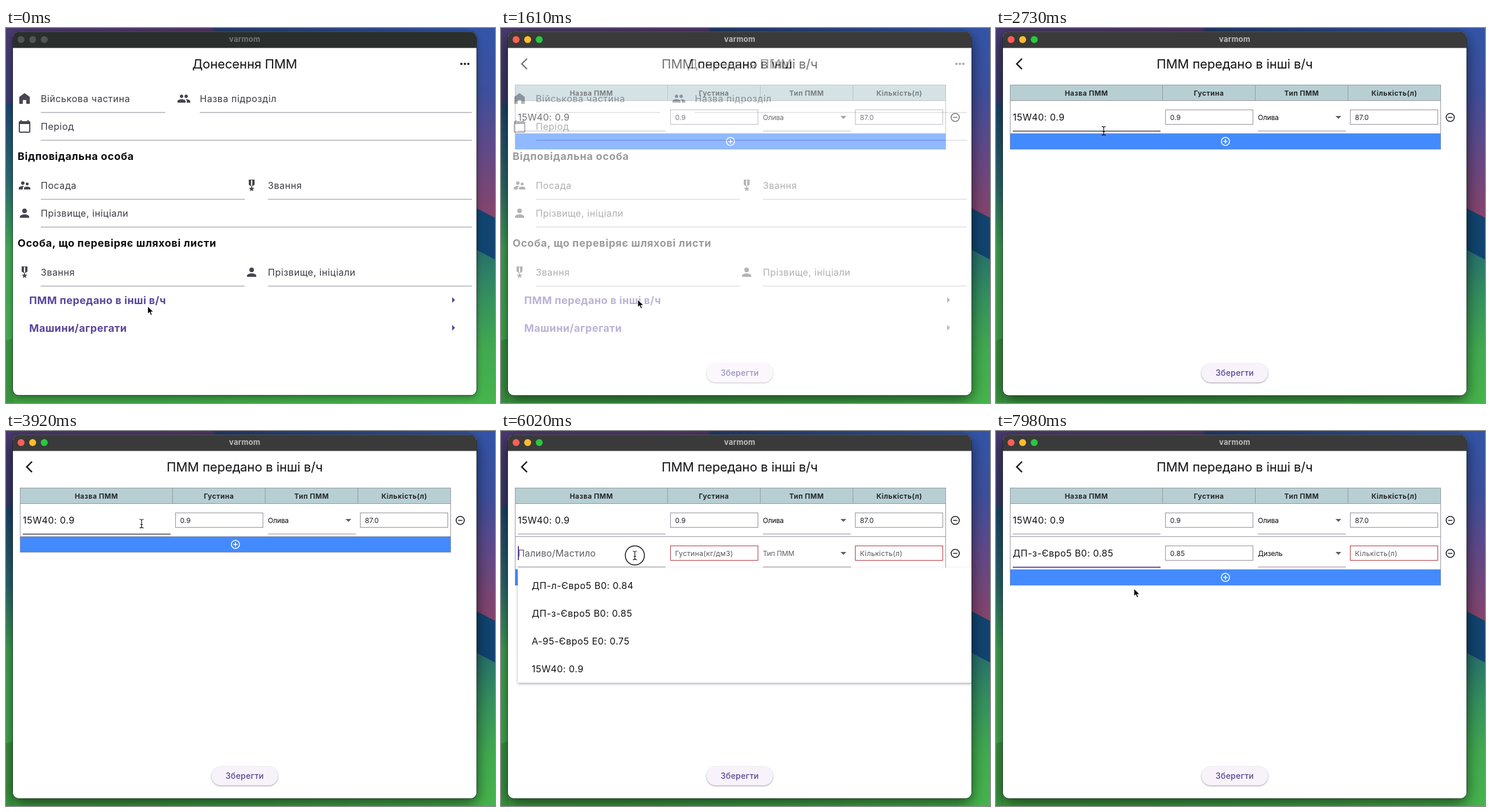
An HTML page for the animation above (8000 ms loop, 844 by 648 pixels).

```html
<!DOCTYPE html>
<html lang="uk">
<head>
<meta charset="utf-8">
<style>
html, body { margin: 0; width: 844px; height: 648px; overflow: hidden; }
svg { display: block; font-family: Inter, sans-serif; }
text { white-space: pre; }
.bar { font-size: 13px; font-weight: 700; letter-spacing: .25px; }
.title { font-size: 22px; letter-spacing: -.12px; fill: #121014; }
.body { font-size: 16px; letter-spacing: .53px; fill: #3d3943; }
.dark { font-size: 16px; letter-spacing: .47px; fill: #131115; }
.hint { font-size: 16px; letter-spacing: .15px; fill: #625d68; }
.head { font-size: 18px; letter-spacing: .58px; font-weight: 700; fill: #0c0a0e; }
.link { font-size: 18px; letter-spacing: .38px; font-weight: 700; fill: #5b4699; }
.col { font-size: 12px; letter-spacing: .5px; font-weight: 700; fill: #25282a; }
.cell { font-size: 12px; letter-spacing: .1px; fill: #221f25; }
.note { font-size: 12px; letter-spacing: .37px; fill: #57525d; }
.pick { font-size: 12px; letter-spacing: -.15px; fill: #060606; }
.save { font-size: 14px; letter-spacing: .25px; font-weight: 500; fill: #574592; }
</style>
</head>
<body>
<svg id="stage" width="844" height="648" viewBox="0 0 844 648">
  <defs>
    <linearGradient id="top">
      <stop offset="0" stop-color="#4a3a6c"/><stop offset=".42" stop-color="#503468"/>
      <stop offset=".43" stop-color="#223a68"/><stop offset="1" stop-color="#3355a8"/>
    </linearGradient>
    <linearGradient id="left" x2="0" y2="1">
      <stop offset="0" stop-color="#4a3a70"/><stop offset=".2" stop-color="#383a6c"/>
      <stop offset=".21" stop-color="#1b456e"/><stop offset=".42" stop-color="#2b6a70"/>
      <stop offset=".6" stop-color="#42a654"/><stop offset="1" stop-color="#46b04c"/>
    </linearGradient>
    <linearGradient id="right" x2="0" y2="1">
      <stop offset="0" stop-color="#3355a8"/><stop offset=".17" stop-color="#3d4f9c"/>
      <stop offset=".3" stop-color="#5c4a8c"/><stop offset=".5" stop-color="#86446c"/>
      <stop offset=".6" stop-color="#28726c"/><stop offset=".72" stop-color="#35905e"/>
      <stop offset=".86" stop-color="#42aa50"/><stop offset="1" stop-color="#46b44c"/>
    </linearGradient>
    <linearGradient id="low">
      <stop offset="0" stop-color="#3f9e42"/><stop offset=".3" stop-color="#3c9e44"/>
      <stop offset="1" stop-color="#46b44c"/>
    </linearGradient>
    <clipPath id="frame"><rect x="12" y="6.5" width="800" height="628" rx="10"/></clipPath>
  </defs>
  <rect width="844" height="648" fill="url(#low)"/>
  <rect width="844" height="8" fill="url(#top)"/>
  <rect width="30" height="634" fill="url(#left)"/>
  <path d="M0 540L13 536V648H0z" fill="#3a9440"/>
  <rect x="800" width="44" height="648" fill="url(#right)"/>
  <path d="M800 305L844 328V400L800 377z" fill="#114470"/>
  <rect id="shade" x="12" y="6.5" width="800" height="628" rx="10" fill="#222"/>
  <rect x="11.5" y="6" width="801" height="629" rx="10.5" fill="none" stroke="#1e2a26" stroke-opacity=".6"/>
  <g clip-path="url(#frame)">
    <rect x="12" y="6.5" width="800" height="628" fill="#fff"/>
    <g id="form"></g>
    <g id="table"></g>
    <rect id="bar" x="12" y="6.5" width="800" height="28"/>
    <text id="name" class="bar" x="412" y="24" text-anchor="middle">varmom</text>
    <circle class="light" cx="26" cy="20" r="6"/>
    <circle class="light" cx="46" cy="20" r="6"/>
    <circle class="light" cx="66" cy="20" r="6"/>
  </g>
  <g id="cursor">
    <circle id="ring" r="16.5" fill="none" stroke="#111" stroke-width="1.5"/>
    <path id="arrow" d="M0 0V14L3.2 11L5.4 16L7.9 15L5.8 10.2H10.2z" fill="#000" stroke="#fff" stroke-width="1.1"/>
    <path id="beam" d="M-3.5-7.5Q0-7.5 0-5.5Q0-7.5 3.5-7.5M0-6V6M-3.5 7.5Q0 7.5 0 5.5Q0 7.5 3.5 7.5M-2 1.5H2" fill="none" stroke="#111" stroke-width="1.2"/>
  </g>
</svg>
<script>
const NS = 'http://www.w3.org/2000/svg';
const $ = id => document.getElementById(id);
const LINE = '#8b8591', RED = '#b3343b', PURPLE = '#5b4699', INK = '#49454f';

const icons = {
  home: 'M3 21V9L12 2.5L21 9V21H15V14.5H9V21z',
  group: 'M16 11c1.66 0 2.99-1.34 2.99-3S17.66 5 16 5s-3 1.34-3 3 1.34 3 3 3zm-8 0c1.66 0 2.99-1.34 2.99-3S9.66 5 8 5 5 6.34 5 8s1.34 3 3 3zm0 2c-2.33 0-7 1.17-7 3.5V19h14v-2.5c0-2.33-4.67-3.5-7-3.5zm8 0c-.29 0-.62.02-.97.05 1.16.84 1.97 1.97 1.97 3.45V19h6v-2.5c0-2.33-4.67-3.5-7-3.5z',
  date: 'M20 3h-1V1h-2v2H7V1H5v2H4c-1.1 0-2 .9-2 2v16c0 1.1.9 2 2 2h16c1.1 0 2-.9 2-2V5c0-1.1-.9-2-2-2zm0 18H4V8h16v13z',
  boss: 'M16.5 12a2.5 2.5 0 1 0 0-5 2.5 2.5 0 0 0 0 5zM9 11a3 3 0 1 0 0-6 3 3 0 0 0 0 6zm7.5 3c-1.83 0-5.5.92-5.5 2.75V19h11v-2.25c0-1.83-3.67-2.75-5.5-2.75zM9 13c-2.33 0-7 1.17-7 3.5V19h7v-2.25c0-.85.33-2.34 2.37-3.47C10.5 13.1 9.66 13 9 13z',
  medal: 'M17 10.43V2H7v8.43c0 .35.18.68.49.86l4.18 2.51-.99 2.34-3.41.29 2.59 2.24L9.07 22 12 20.23 14.93 22l-.78-3.33 2.59-2.24-3.41-.29-.99-2.34 4.18-2.51c.3-.18.48-.5.48-.86zm-4 1.8-1 .6-1-.6V3h2v9.23z',
  person: 'M12 12a4 4 0 1 0 0-8 4 4 0 0 0 0 8zm0 2c-2.67 0-8 1.34-8 4v2h16v-2c0-2.66-5.33-4-8-4z',
  back: 'M17.77 3.77 16 2 6 12l10 10 1.77-1.77L9.54 12z',
  next: 'M10 17l5-5-5-5z',
  drop: 'M7 10l5 5 5-5z'
};

function add(parent, tag, attrs, content) {
  const el = document.createElementNS(NS, tag);
  for (const k in attrs) el.setAttribute(k, attrs[k]);
  if (content) el.textContent = content;
  return parent.appendChild(el);
}
const set = (el, attrs) => { for (const k in attrs) el.setAttribute(k, attrs[k]); };
const show = (el, on) => { el.style.display = on ? '' : 'none'; };
const rect = (p, x, y, width, height, fill) => add(p, 'rect', { x, y, width, height, fill });
const text = (p, cls, x, y, s) => add(p, 'text', { class: cls, x, y }, s);
const mid = (p, cls, x, y, s) => add(p, 'text', { class: cls, x, y, 'text-anchor': 'middle' }, s);
const icon = (p, name, cx, cy, fill = INK) =>
  add(p, 'path', { d: icons[name], fill, transform: `translate(${cx - 12} ${cy - 12})` });
const sign = (p, x, y, stroke, plus) => add(p, 'path', {
  d: `M${x - 7} ${y}a7 7 0 1 0 14 0a7 7 0 1 0-14 0M${x - 3.7} ${y}h7.4` + (plus ? `M${x} ${y - 3.7}v7.4` : ''),
  fill: 'none', stroke, 'stroke-width': 1.6
});
const box = (p, x, y, stroke) => add(p, 'rect', { x: x + .5, y: y + .5, width: 151, height: 25, fill: '#fff', stroke });

// First page
const form = $('form');
function field(name, ix, x, end, y, label) {
  icon(form, name, ix, y);
  text(form, 'body', x, y + 6, label);
  rect(form, x, y + 23.5, end - x, 1, LINE);
}
mid(form, 'title', 412, 70, 'Донесення ПММ');
for (const cx of [786, 792, 798]) add(form, 'circle', { cx, cy: 62, r: 2.1, fill: '#2b282e' });
field('home', 32, 60, 275, 122, 'Військова частина');
field('group', 307, 334.5, 804, 122, 'Назва підрозділ');
field('date', 32, 60, 804, 170, 'Період');
text(form, 'head', 20, 228, 'Відповідальна особа');
field('boss', 32, 60, 412, 272, 'Посада');
field('medal', 424, 452, 804, 272, 'Звання');
field('person', 32, 60, 804, 320, 'Прізвище, ініціали');
text(form, 'head', 20, 378, 'Особа, що перевіряє шляхові листи');
field('medal', 32, 60, 412, 422, 'Звання');
field('person', 424, 452, 804, 422, 'Прізвище, ініціали');
['ПММ передано в інші в/ч', 'Машини/агрегати'].forEach((s, i) => {
  text(form, 'link', 40, 477 + 48 * i, s);
  icon(form, 'next', 772, 470 + 48 * i, PURPLE);
});

// Second page
const table = $('table');
rect(table, 12, 34, 800, 601, '#fff');
icon(table, 'back', 40, 62, '#1d1b20');
mid(table, 'title', 412, 70, 'ПММ передано в інші в/ч');
add(table, 'rect', { x: 24.5, y: 98.5, width: 743, height: 27, fill: '#b7cfd3', stroke: '#929a9e' });
['Назва ПММ', 'Густина', 'Тип ПММ', 'Кількість(л)'].forEach((s, i) => {
  mid(table, 'col', [156, 367.5, 527.5, 687.5][i], 117, s);
  if (i) rect(table, 127 + 160 * i, 98, 1, 28, '#929a9e');
});

function row(y) {
  const g = add(table, 'g', {});
  add(g, 'rect', { x: 24.5, y: y + .5, width: 743, height: 57, fill: '#fff', stroke: '#9b969f' });
  const r = {
    g,
    name: text(g, 'dark', 29, y + 35, '15W40: 0.9'),
    line: rect(g, 29, y + 52.5, 255, 1, LINE),
    left: box(g, 292, y + 16, '#948d99'),
    density: text(g, 'cell', 300.5, y + 34, '0.9'),
    type: text(g, 'pick', 452, y + 34, 'Олива'),
    right: box(g, 611, y + 16, '#948d99'),
    amount: text(g, 'cell', 619.5, y + 34, '87.0')
  };
  rect(g, 452, y + 52.5, 152, 1, LINE);
  icon(g, 'drop', 591, y + 29, '#5f5b63');
  sign(g, 784, y + 29.5, '#1d1b20');
  return r;
}
const first = row(125), second = row(182);
set(second.right, { stroke: RED });
second.amount.textContent = 'Кількість(л)';
set(second.amount, { class: 'note' });
const caret = rect(second.g, 29, 199, 2, 24, PURPLE);

const more = add(table, 'g', {});
add(more, 'rect', { x: 24.5, y: 182.5, width: 743, height: 27, fill: '#448aff', stroke: '#8593ad' });
sign(more, 396, 196, '#fff', true);

const save = add(table, 'rect', { x: 354.5, y: 579.5, width: 115, height: 33, rx: 16.5, fill: '#f8f2fb' });
save.style.filter = 'drop-shadow(0 1px 1.2px #0006)';
mid(table, 'save', 412, 601, 'Зберегти');

const menu = add(table, 'g', {});
rect(menu, 29, 236, 800, 199, '#fff').style.filter = 'drop-shadow(0 2px 2px #4a3a6070)';
['ДП-л-Євро5 B0: 0.84', 'ДП-з-Євро5 B0: 0.85', 'А-95-Євро5 E0: 0.75', '15W40: 0.9']
  .forEach((s, i) => text(menu, 'dark', 53, 273 + 48 * i, s));

// Timeline, ms
const AT = { focus: 490, open: 1540, added: 5180, press: 5950, menu: 5990, chosen: 7600 };
const path = [
  [0, 244.5, 480.5], [1120, 244.5, 480.5], [1260, 236, 469], [2380, 236, 469], [2800, 182, 155],
  [3710, 182, 155], [3900, 234, 160], [4550, 234, 160], [4830, 396, 195], [5250, 396, 195],
  [5750, 231, 215], [6370, 231, 215], [7100, 160, 321], [7840, 160, 321], [7980, 238, 272], [8000, 238, 272]
];
const clamp = v => Math.max(0, Math.min(1, v));
const ease = v => v * v * (3 - 2 * v);

function cursorAt(t) {
  const i = path.findIndex(p => p[0] > t);
  const [t0, x0, y0] = path[i - 1], [t1, x1, y1] = path[i];
  const k = ease((t - t0) / (t1 - t0));
  return [x0 + (x1 - x0) * k, y0 + (y1 - y0) * k];
}

const lights = document.querySelectorAll('.light');
function drawWindow(active) {
  set($('bar'), { fill: active ? '#3a3a3a' : '#2a2f2d' });
  set($('name'), { fill: active ? '#bcbcbc' : '#737775' });
  lights.forEach((el, i) => set(el, { fill: active ? ['#ff5f57', '#febc2e', '#28c840'][i] : '#505453' }));
  $('shade').style.filter = active ? 'drop-shadow(0 8px 12px #0009)' : 'drop-shadow(0 3px 6px #0006)';
}

function drawSecond(t) {
  const chosen = t >= AT.chosen;
  second.name.textContent = chosen ? 'ДП-з-Євро5 B0: 0.85' : 'Паливо/Мастило';
  set(second.name, { class: chosen ? 'dark' : 'hint' });
  second.density.textContent = chosen ? '0.85' : 'Густина(кг/дм3)';
  set(second.density, { class: chosen ? 'cell' : 'note' });
  set(second.left, { stroke: chosen ? '#948d99' : RED });
  second.type.textContent = chosen ? 'Дизель' : 'Тип ПММ';
  second.type.style.fill = chosen ? '' : '#625d68';
  const on = t > AT.menu + 100;
  set(second.line, { height: on ? 2 : 1, fill: on ? PURPLE : LINE });
  show(caret, t >= AT.menu && !chosen && (t - AT.menu) % 1000 < 500);
}

function draw(t) {
  drawWindow(t >= AT.focus);
  table.style.opacity = clamp((t - AT.open) / 120);
  const added = t >= AT.added, [x, y] = cursorAt(t);
  show(second.g, added);
  set(more, { transform: `translate(0 ${added ? 57 : 0})` });
  drawSecond(t);
  show(menu, t >= AT.menu && t < AT.chosen);

  const overRow = t > AT.open && x > 28 && x < 285;
  const overFirst = overRow && y > 130 && y < 178;
  const overSecond = overRow && added && y > 190 && y < 235;
  const left = t > 4600 && t < AT.added;
  set(first.line, { fill: overFirst ? '#47424c' : left ? '#7a6c98' : LINE, height: overFirst || left ? 1.5 : 1 });

  const beam = overFirst || overSecond;
  set($('cursor'), { transform: `translate(${x} ${y})` });
  show($('beam'), beam);
  show($('arrow'), !beam);
  show($('ring'), t >= AT.press && t < 6160);
}

const start = performance.now();
function tick() {
  draw((performance.now() - start) % 8000);
  requestAnimationFrame(tick);
}
tick();
</script>
</body>
</html>
```
